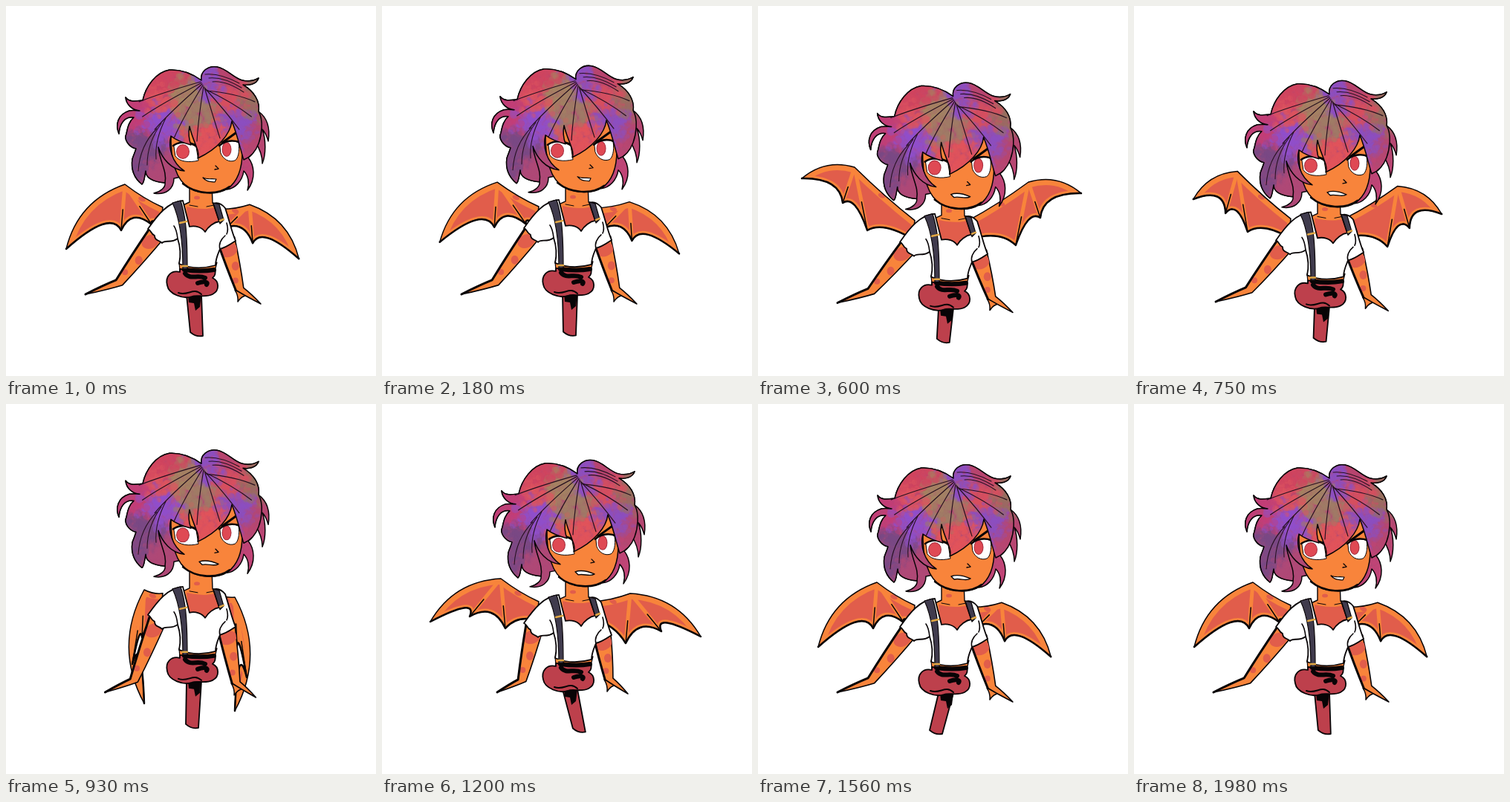
An HTML page with a canvas that plays this animation: 498 by 498 pixels, repeating every 2010 ms.

```html
<!DOCTYPE html>
<html lang="en">
<head>
<meta charset="utf-8">
<title>Winged girl</title>
<style>
html, body { margin: 0; width: 100%; height: 100%; overflow: hidden; background: #fff; }
canvas { display: block; width: 498px; height: 498px; }
</style>
</head>
<body>
<canvas id="stage" width="498" height="498"></canvas>
<script>
const LOOP = 2010;
const INK = '#080406', SKIN = '#f8843b', CORAL = '#e15d4b', PANTS = '#bd404c', STRAP = '#403b4d';
const c = document.getElementById('stage').getContext('2d');
c.lineJoin = c.lineCap = 'round';

// Left wing as peak, tip, two finger ends; then the size of the right wing
const rest = [160, 240, 81, 327, 155, 302, 196, 294, .84];
const spread = [128, 221, 59, 266, 130, 274, 181, 291, 1];
const raised = [130, 217, 59, 232, 114, 265, 147, 302, 1];
const folded = [186, 250, 186, 403, 170, 350, 183, 314, 1];
const droop = [160, 235, 65, 293, 118, 286, 166, 302, 1];

const wingKeys = [[0, rest], [120, rest], [360, spread], [610, raised], [690, raised], [920, folded],
  [980, folded], [1200, droop], [1350, spread], [1530, rest], [LOOP, rest]];
const bobKeys = [[0, [0]], [400, [-3]], [670, [26]], [1000, [-25]], [1300, [0]], [LOOP, [0]]];
const armKeys = [[0, [1]], [700, [1]], [930, [.45]], [1200, [0]], [1500, [1]], [LOOP, [1]]];
const legKeys = [[0, [256]], [360, [248]], [930, [250]], [1220, [265]], [1560, [239]], [LOOP, [256]]];

function at(keys, t) {
  let i = 1;
  while (keys[i][0] < t) i++;
  const [t0, a] = keys[i - 1], [t1, b] = keys[i];
  const k = (1 - Math.cos(Math.PI * (t - t0) / (t1 - t0))) / 2;
  return a.map((v, j) => v + (b[j] - v) * k);
}
const bump = (t, mid, half) => Math.cos(Math.min(1, Math.abs(t - mid) / half) * Math.PI / 2);
const mix = (a, b, k) => [a[0] + (b[0] - a[0]) * k, a[1] + (b[1] - a[1]) * k];
const add = (a, n, k) => [a[0] + n[0] * k, a[1] + n[1] * k];
let seed = 7;
const rand = () => (seed = seed * 16807 % 2147483647) / 2147483647;

function shape(d, fill, line, width = 1.5) {
  const p = d instanceof Path2D ? d : new Path2D(d);
  if (fill) { c.fillStyle = fill; c.fill(p); }
  if (line) { c.strokeStyle = line; c.lineWidth = width; c.stroke(p); }
}
// Alternating anchors and controls
function curve(pts, close) {
  const p = new Path2D();
  p.moveTo(...pts[0]);
  for (let i = 1; i + 1 < pts.length; i += 2) p.quadraticCurveTo(...pts[i], ...pts[i + 1]);
  if (close) p.closePath();
  return p;
}
function dot([x, y], rx, ry, fill, angle = 0) {
  c.fillStyle = fill;
  c.beginPath();
  c.ellipse(x, y, rx, ry, angle, 0, 7);
  c.fill();
}
function inside(path, paint) {
  c.save();
  c.clip(path);
  paint();
  c.restore();
}
function shifted(x, y, paint) {
  c.save();
  c.translate(x, y);
  paint();
  c.restore();
}

// Mottled paint: every dab takes the colour of the nearest anchor
function paintHair() {
  const anchors = [['#d0455f', 218, 98], ['#dd5560', 212, 130], ['#e2555c', 268, 175], ['#d8505f', 305, 124],
    ['#8c50c4', 274, 100], ['#9150cb', 206, 152], ['#8c50c0', 318, 155], ['#a58461', 238, 118],
    ['#a07c66', 258, 148], ['#96705f', 332, 132], ['#c43f78', 170, 140], ['#b8456e', 300, 90],
    ['#7a4a86', 180, 198], ['#b04a78', 215, 222], ['#c24478', 330, 225], ['#b54870', 345, 170]];
  const sheet = document.createElement('canvas');
  sheet.width = sheet.height = 498;
  const g = sheet.getContext('2d');
  g.fillStyle = '#b14a75';
  g.fillRect(0, 0, 498, 498);
  g.globalAlpha = .45;
  for (let i = 0; i < 4000; i++) {
    const x = 140 + 220 * rand(), y = 75 + 190 * rand();
    const jx = x + 26 * (rand() - .5), jy = y + 22 * (rand() - .5);
    const gap = a => Math.hypot(a[1] - jx, a[2] - jy);
    g.fillStyle = anchors.reduce((a, b) => gap(b) < gap(a) ? b : a)[0];
    g.beginPath();
    g.arc(x, y, 2 + 4 * rand(), 0, 7);
    g.fill();
  }
  return c.createPattern(sheet, 'no-repeat');
}
const HAIR = paintHair();

const crown = 'M161,123C166,130 176,128 184,127C188,108 202,89 220,86C238,85 252,92 263,100C261,88 272,80 284,82' +
  'C297,84 306,97 318,100C326,102 333,101 340,97C337,106 326,107 319,106C334,115 342,128 340,142';
const leftSide = 'C192,236 188,228 188,222C186,232 186,238 183,240C173,232 168,220 170,206C172,200 174,196 175,192' +
  'C166,190 158,180 162,172C164,162 166,155 172,150C160,148 153,158 152,172C147,160 150,146 166,141' +
  'C172,140 176,141 180,141C170,140 162,133 161,123Z';
const backHair = new Path2D(crown + 'C351,150 356,163 353,182C351,175 349,170 345,166C350,180 350,200 345,212' +
  'C345,200 340,190 336,184C338,192 330,202 326,204C334,214 337,232 325,248C328,238 326,228 320,222' +
  'C318,236 308,246 297,247C307,240 312,230 312,215L226,232C226,246 215,255 199,252C208,250 215,244 214,238' + leftSide);
const frontHair = new Path2D(crown + 'C347,154 344,174 340,185C336,196 330,203 320,207C316,196 313,178 304,155' +
  'C302,172 286,192 258,205C262,196 252,184 247,162C245,172 246,179 249,187C238,184 228,180 222,175' +
  'C218,190 223,211 240,222C222,220 210,205 205,190C207,210 217,222 214,238' + leftSide);

// Strands fan out from the parting, side locks hang below
function drawStrands() {
  inside(frontHair, () => {
    for (let i = 0; i < 9; i++) {
      const a = Math.PI * (1.02 - i * .13);
      const x = 257 + 78 * Math.cos(a), y = 132 + 50 * Math.sin(a);
      shape(`M${262 + i},${102 + i * 1.5}Q${mix([x, y], [262, 96], .35)} ${x},${y}`, null, '#271020', 1.2);
    }
    for (let i = 0; i < 3; i++) {
      shape(`M${178 + i * 12},${222 - i * 8}Q${180 + i * 10},${188 - i * 4} ${203 + i * 6},${165 - i * 7}`, null, '#271020', 1.1);
      shape(`M${268 + i * 5},${92 + i * 5}Q${288 + i * 4},${90 + i * 5} ${314 + i * 3},${104 + i * 6}`, null, '#271020', 1.1);
    }
  });
}

function drawWing(root, peak, tip, f1, f2, base) {
  const side = Math.sign(root[0] - 248);
  const bow = add(mix(peak, tip, .5), [(tip[1] - peak[1]) * side, (peak[0] - tip[0]) * side], .27);
  const web = (a, b, k) => mix(mix(a, b, .5), peak, k);
  const lead = [root, add(mix(root, peak, .5), [0, 1], 4), peak, bow, tip];
  const edge = [tip, web(tip, f1, .55), f1, web(f1, f2, .45), f2, web(f2, base, .2), base];
  const outline = curve([...lead, ...edge.slice(1)], true);
  shape(outline, CORAL);
  inside(outline, () => {
    shape(outline, null, SKIN, 8);
    shape(curve(lead), null, SKIN, 15);
    for (const f of [f1, f2]) {
      shape(curve([f, mix(f, peak, .5), peak]), null, SKIN, 5);
      shape(curve([f, mix(f, peak, .25), mix(f, peak, .45)]), null, INK, 1.5);
    }
    dot(add(mix(peak, root, .45), [0, 1], 6), 5, 3, CORAL, .4);
  });
  shape(outline, null, INK, 1.5);
  shape(curve(edge), null, INK, 2.5);
}

function drawWings(t, dy) {
  const v = at(wingKeys, t), size = v[8];
  const reach = 1 + .06 * bump(t, 465, 120) + .07 * bump(t, 1350, 120);
  const left = [[211, 271 + dy], ...[0, 2, 4, 6].map(i => [248 + (v[i] - 248) * reach, v[i + 1]]), [208, 296 + dy]];
  // The far wing mirrors the near one and hangs lower
  const right = left.map(([x, y]) =>
    [296 + (198 - x) * size, 285 + (y - 285) * size + 20 * Math.max(0, Math.min(1, (206 - x) / 40))]);
  drawWing(...left);
  drawWing(...right);
}

function drawArm(shoulder, wrist, tip, finger) {
  const len = Math.hypot(wrist[0] - shoulder[0], wrist[1] - shoulder[1]);
  const n = [(shoulder[1] - wrist[1]) / len, (wrist[0] - shoulder[0]) / len];
  const elbow = mix(shoulder, wrist, .55), palm = mix(wrist, tip, .4);
  if (finger) shape(curve([add(wrist, n, 6), add(wrist, [-1, 9], 1), add(wrist, [-2, 17], 1), add(wrist, [3, 9], 1), palm], true), SKIN, INK);
  const pts = [add(shoulder, n, 12), add(elbow, n, 9), add(wrist, n, 5), add(palm, n, 4), tip,
    add(palm, n, -5), add(wrist, n, -6), add(elbow, n, -10), add(shoulder, n, -12)];
  const outline = curve(pts, true);
  shape(outline, SKIN, INK, 1.6);
  inside(outline, () => {
    dot(mix(shoulder, wrist, .22), 12, 9, CORAL, -.4);
    dot(add(elbow, n, -3), 5, 6, CORAL);
    dot(add(mix(shoulder, wrist, .82), n, 2), 4, 4, CORAL);
  });
  shape(curve(finger ? pts.slice(0, 3) : pts.slice(0, 5)), null, INK, 3);
}

function drawArms(t, dy) {
  const [out] = at(armKeys, t), low = Math.max(0, dy) * .65;
  const left = [188 - 36 * out, 372 + low], right = [305 + 9 * out, 370 + 11 * out + low];
  drawArm([206, 302 + dy], left, add(left, [-33 - 12 * out, 16], 1), false);
  drawArm([296, 314 + dy], right, add(right, [26 + 3 * out, 20], 1), true);
}

function drawLeg(x, dy) {
  const top = 389 + dy, end = 444 + dy * .5;
  shape(`M243,${top}L263,${top}L${x + 9},${end}Q${x},${end + 2} ${x - 8},${end - 5}Z`, PANTS, INK, 1.8);
  shape(`M245,${top}L263,${top}L261,${top + 16}L255,${top + 21}L253,${top + 11}L246,${top + 10}Z`, INK);
}

function drawPants() {
  shape('M233,345L284,345L281,357L234,357Z', SKIN, INK, 1.2);
  shape('M234,354C245,356 270,356 281,353C283,359 281,364 278,366C287,370 288,383 278,388' +
    'C268,393 257,388 250,391C239,395 219,388 217,376C214,364 222,355 234,358Z', PANTS, INK, 1.8);
  shape('M240,355Q262,358 280,355M241,360C248,369 258,361 268,366M258,373C266,370 273,371 270,375', null, INK, 6);
  shape('M232,386C245,391 252,378 263,388', null, INK, 2);
}

function drawNeck() {
  shape('M247,238L247,264L234,270L240,306L285,306L291,270L278,265L277,238Z', SKIN, INK, 1.4);
  shape('M243,270C255,273 272,275 286,270L288,296L268,306L246,300Z', CORAL);
  dot([257, 258], 4, 2.5, CORAL);
  shape('M247,268L258,270M270,270L280,268', null, INK, 1);
}

function drawShirt() {
  shape('M238,262C218,264 205,280 191,300C196,302 194,306 200,309C200,316 206,315 210,319C214,314 222,320 231,313' +
    'C235,325 235,338 233,347C250,354 268,353 282,349C282,340 286,332 288,327C296,325 300,322 309,316' +
    'C304,305 301,290 295,272C290,266 284,264 279,266L287,290C280,291 272,297 268,304C264,298 255,295 247,297Z', '#fff', INK, 1.8);
  shape('M231,313C230,304 229,300 226,296M288,327C286,321 289,314 295,309M297,292C299,299 299,303 297,307', null, INK, 1.6);
  shape('M224,265L235,262C241,280 244,300 244,354L238,354C238,315 234,286 224,265Z', STRAP, INK, 1.2);
  shape('M279,265L287,267L293,288L288,293Z', STRAP, INK, 1.2);
  shape('M234,292L243,290M237,350L244,350M288,289L293,287', null, '#e1a743', 2.5);
}

function drawEye(outline, iris, r) {
  const white = new Path2D(outline);
  shape(white, '#fff', INK, 1);
  inside(white, () => {
    dot(iris, r, 10, '#a52f3f');
    dot(iris, r - 1, 9, '#df4954');
  });
}

function drawEyes(open) {
  if (open < .4) {
    shape('M230,209Q242,216 258,211M293,207Q303,211 311,205', null, INK, 2);
    return;
  }
  c.save();
  c.translate(0, 209 * (1 - open));
  c.scale(1, open);
  drawEye('M226,187C235,182 249,184 256,190L259,208C247,211 233,210 228,202Z', [238, 196], 9);
  drawEye('M288,187C295,180 306,180 313,184C315,196 312,206 308,208C300,211 292,206 289,198Z', [297, 193], 6.5);
  shape('M225,188C235,181 248,183 258,189M287,188C295,181 304,180 314,183', null, INK, 2.6);
  c.restore();
}

function drawHead(open, wide) {
  shape(backHair, HAIR, INK, 1.5);
  shape('M222,170C221,214 231,236 247,245C262,254 286,254 298,246C311,237 318,220 318,196L312,145L228,145Z', SKIN, INK, 1.5);
  shape('M238,239C256,254 285,255 301,243', null, INK, 2.4);
  dot([326, 193], 6, 10, '#c9bc9b', .3);
  drawEyes(open);
  shape('M291,184L309,171', null, INK, 3);
  shape('M282,215L286,219L281,220', null, INK, 1.3);
  if (wide) shape('M260,232C268,229 279,232 286,235C280,239 272,234 264,236Z', '#fff', INK, 1.4);
  else shape('M265,231C271,234 276,232 283,233L281,237C275,236 270,237 265,231Z', '#fff', INK, 1.2);
  shape(frontHair, HAIR, INK, 1.5);
  drawStrands();
}

function draw(t) {
  c.clearRect(0, 0, 498, 498);
  const [bob] = at(bobKeys, t), dy = bob * .82;
  drawWings(t, dy);
  drawLeg(at(legKeys, t)[0], dy);
  shifted(0, dy, () => { drawPants(); drawNeck(); });
  drawArms(t, dy);
  shifted(0, dy, drawShirt);
  const blink = Math.min(1, 1.6 * bump(t, 360, 110));
  shifted(-6 * bump(t, 370, 240), bob, () => drawHead(1 - blink, t > 480 && t < 1650));
}

function tick(now) {
  draw(now % LOOP);
  requestAnimationFrame(tick);
}
draw(0);
requestAnimationFrame(tick);
</script>
</body>
</html>
```
